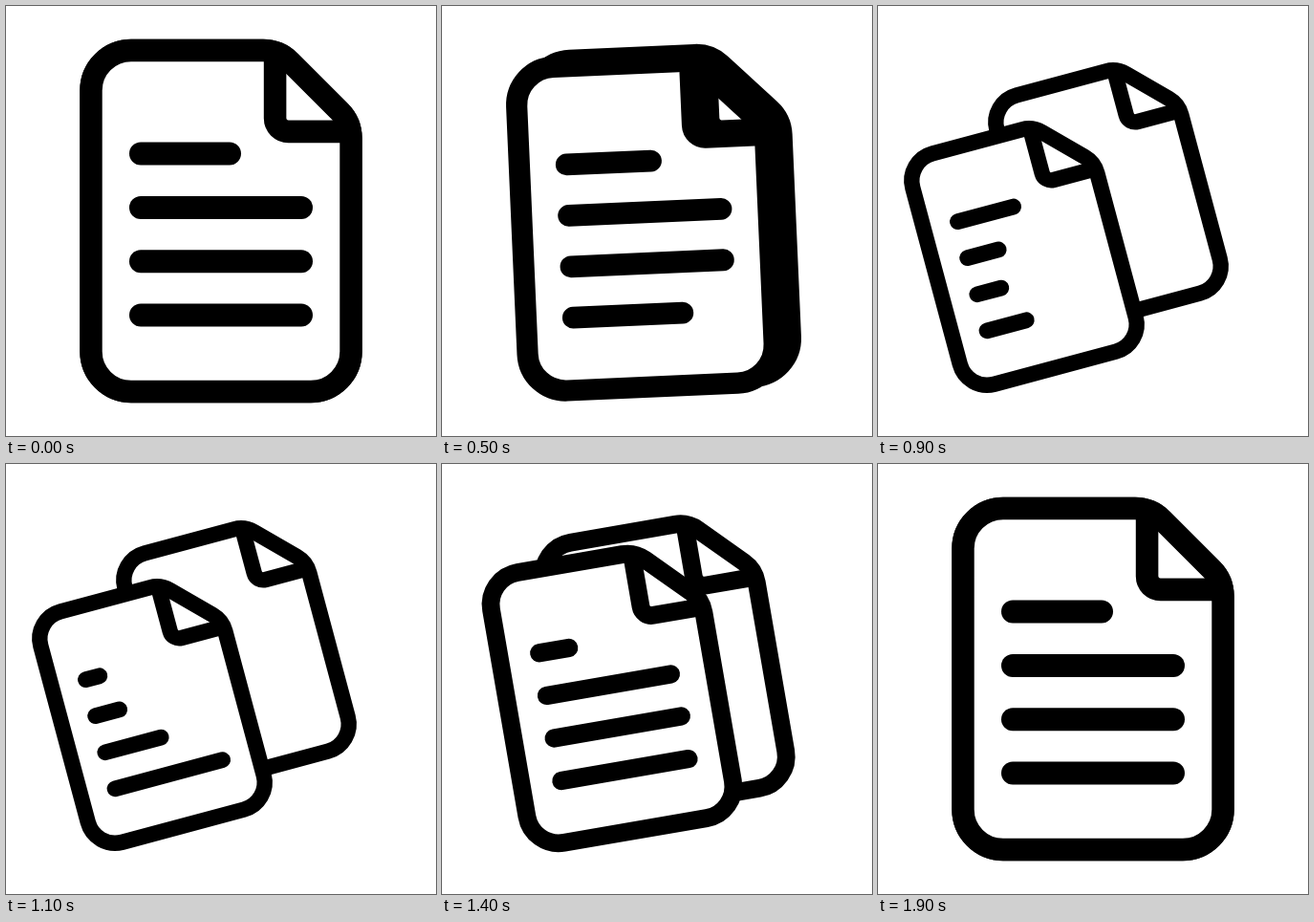
Animation, 450 px wide and 450 px high, one loop 2200 ms. Source, as an HTML page:

```html
<!DOCTYPE html>
<html lang="en">
<head>
<meta charset="utf-8">
<title>Copy document</title>
<style>
  html, body { margin: 0; height: 100%; overflow: hidden; background: #fff; }
  svg { display: block; width: 100%; height: 100%; }
  .ink { fill: none; stroke: #000; stroke-width: 23.4; }
  #lines { stroke-width: 24; stroke-linecap: round; }
</style>
</head>
<body>
<svg viewBox="0 0 450 450">
  <defs>
    <g id="page">
      <path fill="#fff" d="M281.5 46.5H131a42 42 0 0 0-42 42V361.5a42 42 0 0 0 42 42H319a42 42 0 0 0 42-42V131.5H295.5a14 14 0 0 1-14-14Z"/>
      <path class="ink" d="M269 46.5H131a42 42 0 0 0-42 42V361.5a42 42 0 0 0 42 42H319a42 42 0 0 0 42-42V138.6a40 40 0 0 0-11.7-28.3L297.3 58.2A40 40 0 0 0 269 46.5Z"/>
      <path class="ink" d="M281.5 52V117.5a14 14 0 0 0 14 14H355"/>
    </g>
  </defs>
  <g id="stack">
    <use id="back" href="#page"/>
    <use href="#page"/>
    <g id="lines" class="ink"><path/><path/><path/><path/></g>
  </g>
</svg>
<script>
const LOOP = 2200, STEP = 100;
const stack = document.getElementById('stack');
const back = document.getElementById('back');
const lines = [...document.querySelectorAll('#lines path')];

// Symmetric ease-in-out of the given power, from 0 at start to 1 after duration.
function ease(time, start, duration, power) {
  const t = Math.min(1, Math.max(0, (time - start) / duration));
  const half = u => 2 ** (power - 1) * u ** power;
  return t < 0.5 ? half(t) : 1 - half(1 - t);
}

function draw(time) {
  const tilt = ease(time, 272, 599, 4) - ease(time, 1134, 583, 4);
  const spread = ease(time, 287, 599, 4) - ease(time, 1111, 583, 4);

  stack.setAttribute('transform',
    `translate(${225 - 72 * tilt} ${225 + 33 * spread}) rotate(${-15 * tilt}) ` +
    `scale(${1 - 0.3 * tilt}) translate(-225 -225)`);
  back.setAttribute('transform', `translate(${144 * spread} ${-51.6 * spread})`);

  // Lines shorten and regrow one after another, from the bottom up.
  lines.forEach((line, i) => {
    const order = 3 - i;
    const shrink = ease(time, 343 + 152 * order, 350, 3);
    const grow = ease(time, 757 + 161 * order, 400, 3);
    const width = (i ? 168 : 93) * (1 - 0.78 * (shrink - grow));
    line.setAttribute('d', `M141 ${154.6 + 56.3 * i}h${width}`);
  });
}

function tick() {
  draw(Math.floor(performance.now() % LOOP / STEP) * STEP);
  requestAnimationFrame(tick);
}
tick();
</script>
</body>
</html>
```
